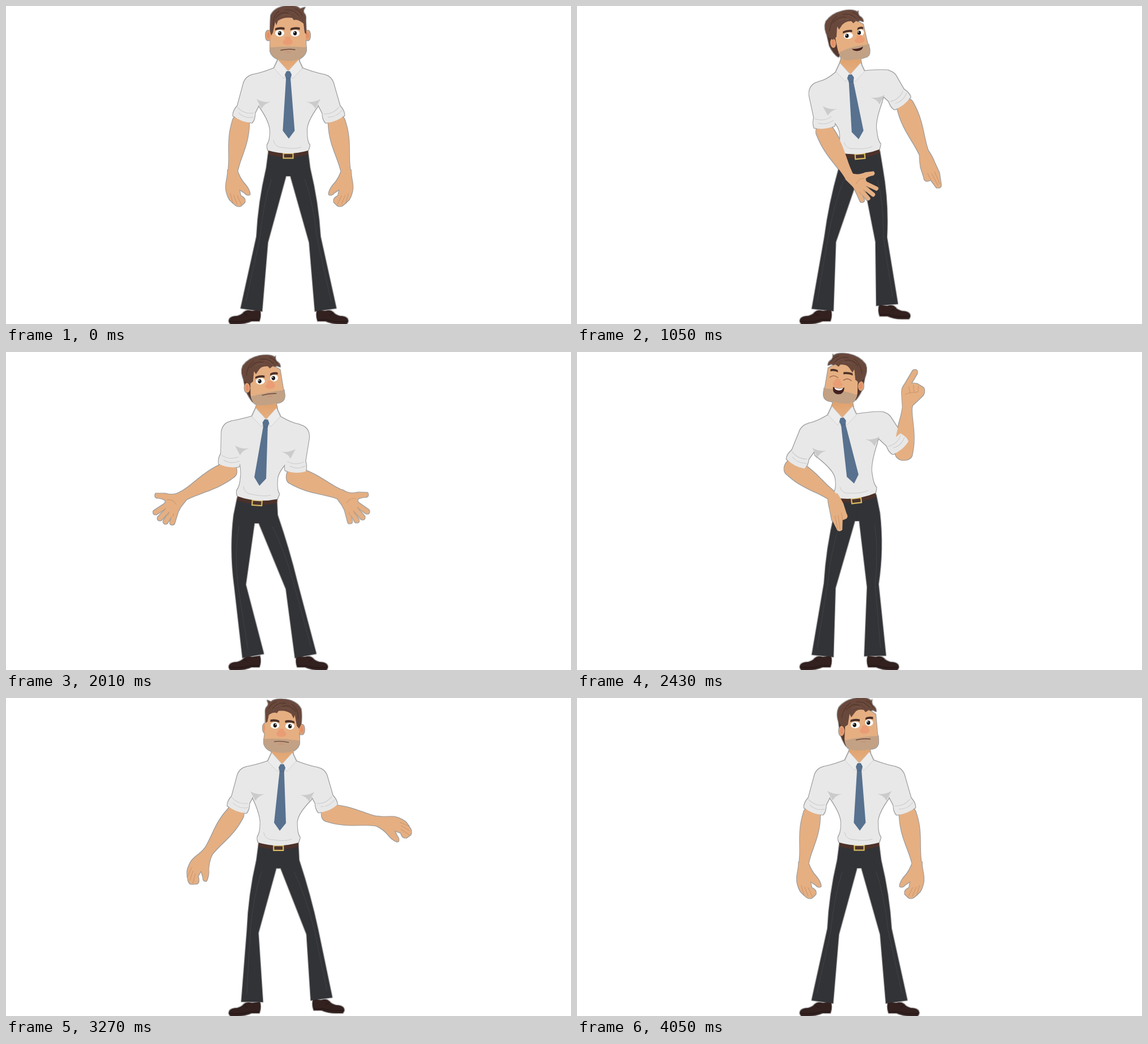
An HTML page for the animation above (4080 ms loop, 997 by 561 pixels).

```html
<!DOCTYPE html>
<html lang="en">
<head>
<meta charset="utf-8">
<title>Gesturing office man</title>
<style>
  html, body { margin: 0; width: 100%; height: 100%; overflow: hidden; background: #fff; }
  svg { display: block; width: 100vw; height: 100vh; }
</style>
</head>
<body>
<svg viewBox="0 0 997 561">
  <defs>
    <filter id="edge" filterUnits="userSpaceOnUse" x="0" y="-10" width="997" height="580" color-interpolation-filters="sRGB">
      <feMorphology in="SourceAlpha" operator="dilate" radius="1" result="fat"/>
      <feFlood flood-color="#9c9c9c"/>
      <feComposite in2="fat" operator="in" result="rim"/>
      <feMerge><feMergeNode in="rim"/><feMergeNode in="SourceGraphic"/></feMerge>
    </filter>
    <linearGradient id="throat" x1="0" y1="0" x2="0" y2="1">
      <stop offset="0" stop-color="#dfa06a"/><stop offset="1" stop-color="#e6b184"/>
    </linearGradient>
  </defs>
  <g id="man" filter="url(#edge)"></g>
</svg>
<script>
const LOOP = 4080, STEP = 30;
const SKIN = '#e5af82', CREASE = '#c58f66', SHIRT = '#e8e8e8', FOLD = '#cbcbcb';
const PANTS = '#323337', HAIR = '#69483c', DARK = '#4b3129', TIE = '#57718f', SHOE = '#33211f';

// Arms: shoulder x y, elbow x y, wrist x y, hand angle
function arm(side, type, sx, sy, ex, ey, wx, wy, hand) {
  const dx = wx - ex, dy = wy - ey;
  return { side, type, v: [sx, sy, ex, ey, Math.atan2(dy, dx) * 180 / Math.PI, Math.hypot(dx, dy), hand] };
}
const left = (type, ...p) => arm(1, type, ...p);
const right = (type, ...p) => arm(-1, type, ...p);

// Body: neck x y, hip x y, hip tilt, left knee, right knee, foot shift, head yaw, head tilt
const stand = {
  face: 'calm', body: [498, 117, 498, 264, 0, 452, 545, 0, 0, 0],
  l: left('relaxed', 439, 143, 414, 208, 400, 293, 78),
  r: right('relaxed', 558, 143, 584, 208, 600, 293, 102)
};
const heart = {
  face: 'smile', body: [501, 125, 543, 265, -12, 475, 563, 0, 1, -10],
  l: left('chest', 455, 166, 479, 235, 557, 190, -66),
  r: right('flat', 570, 126, 622, 150, 592, 236, 90)
};
const shrug = {
  face: 'calm', body: [458, 120, 443, 265, 4, 410, 503, -36, 1, 0],
  l: left('open', 399, 142, 384, 206, 292, 207, 160),
  r: right('open', 515, 148, 526, 216, 614, 240, 20)
};
const offer = {
  face: 'calm', body: [459, 121, 443, 266, 4, 413, 504, -36, .5, -4],
  l: left('open', 401, 144, 392, 209, 311, 255, 140),
  r: right('open', 514, 150, 510, 219, 591, 252, 42)
};
const laugh = {
  face: 'laugh', body: [468, 118, 493, 262, -7, 446, 522, -36, -.55, 4],
  l: left('flat', 412, 148, 381, 205, 452, 255, 85),
  r: right('point', 537, 128, 577, 176, 583, 95, -86)
};
const swing = {
  face: 'calm', body: [493, 119, 477, 265, 2, 432, 546, 2, 0, 0],
  l: left('relaxed', 433, 142, 411, 205, 350, 262, 113),
  r: right('relaxed', 550, 150, 570, 212, 620, 285, 70)
};
const nudge = (a, turn) => ({ ...a, v: a.v.map((n, i) => i === 4 || i === 6 ? n + turn : n) });
const wide = { ...swing, l: nudge(swing.l, 16), r: nudge(swing.r, -17) };
const glance = yaw => ({ ...stand, body: stand.body.map((n, i) => i === 8 ? yaw : n) });

const smooth = u => u * u * (3 - 2 * u);
const speedUp = u => u * u;
const slowDown = u => u * (2 - u);
// Each key: time, pose, easing used to arrive there
const KEYS = [
  [0, stand], [450, heart, smooth], [890, heart, smooth], [1240, shrug, smooth],
  [1580, shrug, smooth], [1980, offer, smooth], [2010, offer, smooth], [2350, laugh, smooth],
  [3030, laugh, smooth], [3380, wide, smooth], [3570, swing, speedUp],
  [3870, glance(.1), slowDown], [4050, glance(.5), smooth], [LOOP, glance(.5), smooth]
];

const mix = (a, b, u) => a.map((n, i) => n + (b[i] - n) * u);
function poseAt(t) {
  const i = KEYS.findIndex(k => k[0] > t);
  const [t0, a] = KEYS[i - 1], [t1, b, ease] = KEYS[i];
  const u = ease((t - t0) / (t1 - t0)), near = u < .5 ? a : b;
  const limb = k => ({ ...near[k], v: mix(a[k].v, b[k].v, u) });
  return { face: near.face, body: mix(a.body, b.body, u), l: limb('l'), r: limb('r') };
}

const shape = (fill, d, more = '') => `<path fill="${fill}" d="${d}" ${more}/>`;
const line = (color, width, d) =>
  `<path fill="none" stroke="${color}" stroke-width="${width}" stroke-linecap="round" stroke-linejoin="round" d="${d}"/>`;
const oval = (fill, x, y, rx, ry) => `<ellipse fill="${fill}" cx="${x}" cy="${y}" rx="${rx}" ry="${ry}"/>`;
const place = (x, y, angle, inner, sx = 1, sy = 1) =>
  `<g transform="translate(${x} ${y}) rotate(${angle}) scale(${sx} ${sy})">${inner}</g>`;

const openHand =
  shape(SKIN, 'M-5-8L14-12Q24-17 29-15L36 3Q36 9 30 11L27 14Q28 20 36 27Q38 33 32 34L20 24Q10 9-5 8Z') +
  line(SKIN, 8, 'M29 6L54 9M29-1L55-4M28-8L51-15M23-11L43-24') +
  line(CREASE, .8, 'M24 13Q15 7 17-4M36 3L42 2.5M35-6L41-9M31-13L35-16');
const HANDS = {
  open: openHand,
  chest: place(0, 0, 0, openHand, .93, -.93),
  relaxed:
    shape(SKIN, 'M-5 8C8 10 18 18 29 18Q40 18 47 15L58 7Q64 1 60-4L56-10Q50-13 44-5L32-5L40-13Q48-18 44-22Q36-22 28-18Q14-9-5-8Z') +
    line(CREASE, .8, 'M57 4L40 7M53 11L36 12M59-3L42 1'),
  flat:
    shape(SKIN, 'M-5 9Q10 10 20 8L40 6L60-2Q64-6 60-11L43-13L41-20Q37-24 32-21L14-17Q4-13-5-8Z') +
    line(CREASE, .8, 'M57-3L34 0M58-7L34-6M43-13L30-12'),
  point:
    shape(SKIN, 'M-4 8L18 11Q30 13 36 8Q42-4 40-14L34-26Q26-32 17-23L2-9L-4-8Z') +
    line(SKIN, 9, 'M32 5L60-9') +
    line(CREASE, .8, 'M34 0L24-3L20 5M37-8L25-10L23-3M36-17L26-17L24-10')
};

function forearm({ side, type, v: [, , ex, ey, angle, len, hand] }) {
  const a = len * .4, b = len * .65, rad = angle * Math.PI / 180;
  const d = `M-2-15C-19-15-19 15-2 15C${a} 20 ${b} 9 ${len} 8V-8C${b}-9 ${a}-20-2-15Z`;
  return place(ex, ey, angle, shape(SKIN, d)) +
    place(ex + len * Math.cos(rad), ey + len * Math.sin(rad), hand, HANDS[type], 1, side);
}

function sleeve({ v: [sx, sy, ex, ey] }, cuffOnly) {
  const angle = Math.atan2(ey - sy, ex - sx) * 180 / Math.PI;
  const c = Math.hypot(ex - sx, ey - sy) - 9;
  const cuff = shape(SHIRT, `M${c - 20}-16Q${c - 9}-21 ${c}-18Q${c + 6} 0 ${c} 18Q${c - 9} 21 ${c - 20} 16Z`) +
    line(FOLD, 1, `M${c - 17}-14Q${c - 9} 0 ${c - 16} 15M${c - 10}-17Q${c - 2}-3 ${c - 8} 10`);
  const upper = shape(SHIRT, `M0-21C-29-21-29 21 0 21L${c - 12} 16V-16Z`);
  return place(sx, sy, angle, cuffOnly ? cuff : upper);
}

function armpit({ side, v: [x, y] }) {
  const at = (dx, dy) => `${x + dx * side} ${y + dy}`;
  return shape(FOLD, `M${at(3, 21)}Q${at(14, 28)} ${at(28, 26)}Q${at(17, 29)} ${at(12, 38)}Z`);
}

function torso(nx, ny, hx, hy, tilt, l, r) {
  const rad = tilt * Math.PI / 180;
  const hip = (x, y) => `${hx + x * Math.cos(rad) - y * Math.sin(rad)} ${hy + x * Math.sin(rad) + y * Math.cos(rad)}`;
  const top = ({ side, v: [x, y] }) => `${nx - 23 * side} ${ny - 8}Q${x + 10 * side} ${y - 24} ${x - 4 * side} ${y - 22}`;
  const pit = ({ side, v: [x, y] }) => `${x + 8 * side} ${y + 34}`;
  const [lx, ly] = l.v, [rx, ry] = r.v;
  return shape(SHIRT,
    `M${top(l)}L${lx} ${ly}L${pit(l)}Q${hip(-31, -58)} ${hip(-32, -42)}Q${hip(-32, -26)} ${hip(-37, -19)}` +
    `Q${hip(-38, -14)} ${hip(-35, -9)}Q${hip(0, 1)} ${hip(35, -9)}L${hip(38, -18)}Q${hip(33, -24)} ${hip(33, -42)}` +
    `Q${hip(31, -58)} ${pit(r)}L${rx} ${ry}L${rx + 4} ${ry - 22}Q${rx - 10} ${ry - 24} ${nx + 23} ${ny - 8}Z`) +
    line(FOLD, 1, `M${hip(-26, -27)}Q${hip(-24, -14)} ${hip(-8, -14)}Q${hip(12, -11)} ${hip(23, -15)}`);
}

function trousers(hx, hy, tilt, kneeL, kneeR, footR, footY) {
  const rad = tilt * Math.PI / 180;
  const leg = (side, kx, ax, ay) => {
    const ky = 410, out = -side;
    const shin = Math.atan2(kx - ax, ay - ky), c = 19 * side * Math.cos(shin), s = 19 * side * Math.sin(shin);
    const bx = hx + out * 35 * Math.cos(rad), by = hy - 6 + out * 35 * Math.sin(rad);
    const ox = kx + out * 10, ix = kx - out * 10;
    // The thigh bulges less the further the leg is spread
    const splay = Math.max(0, (ox - bx) * out);
    const tx = hx + out * (42 - splay * .16), ty = hy + 22;
    const mx = (tx + ox) / 2 + out * Math.max(0, 9 - splay * .15), my = (ty + ky) / 2;
    const crotch = hx - tilt * .17;
    return shape(PANTS,
      `M${hx} ${hy - 3}L${bx} ${by}L${tx} ${ty}Q${mx} ${my} ${ox} ${ky - s}` +
      `L${ax - c} ${ay - s}L${ax + c} ${ay + s}L${ix} ${ky + s + 4}` +
      `L${crotch + out * 4} ${hy + 36}H${crotch - out}Z`) +
      line('#45464a', .8, `M${tx - out * 9} ${ty + 20}Q${mx - out * 9} ${my} ${kx + out * 4} ${ky}L${ax - c * .5} ${ay - s * .5 - 14}`);
  };
  const belt = shape(DARK, 'M-35-10Q0 1 35-10V-2Q0 8-35-2Z') +
    '<rect x="-8.5" y="-4" width="17" height="8.5" fill="#4b332d" stroke="#d8bb62" stroke-width="2.2"/>';
  return leg(1, kneeL, 433 - (kneeL - 452) * .08, 536) +
    leg(-1, kneeR, 564 + footR - (kneeR - footR - 545) * .15, 536 + footY) + place(hx, hy, tilt, belt);
}

const shoe = shape(SHOE, 'M420 540Q425 535 434 538L448 536Q451 546 447 556H433Q422 561 408 561H396Q391 556 395 551Q399 547 408 547Q416 545 420 540Z') +
  line('#1f1414', 1, 'M394 556Q408 558 420 556L432 553H447M419 541L426 546');

function collar(x, y, dir) {
  const flap = s => shape('#ececec', `M${18 * s}-22L${25 * s}-7L${8 * s} 11L0-2Z`, `stroke="${FOLD}" stroke-width=".8"`);
  const n = Math.hypot(dir.x, dir.y), ang = Math.atan2(-dir.x, dir.y) * 180 / Math.PI;
  const tie = shape(TIE, `M-3-2H3L6 4L4 11L10.5 ${n - 14}L0 ${n}L-10.5 ${n - 14}L-4 11L-6 4Z`) +
    line('#486180', .8, 'M-4 11H4');
  return place(x, y, 0, flap(-1) + flap(1)) + place(x, y, ang, tie);
}

function head(yaw, face) {
  // m follows the whole turn, h covers what is done after half of it
  const y = Math.abs(yaw), half = Math.min(1, y * 2);
  const m = (a, b) => a + (b - a) * y, h = (a, b) => a + (b - a) * half;
  const jaw = `L${m(-32, -18)} -16Q${m(-29, -17)} ${m(-5, -9)} ${m(-15, -9)} ${h(0, -3)}Q${m(0, 10)} ${h(4, -1)} ${m(15, 26)} ${h(0, -5)}` +
    `Q${m(30, 36)} -6 ${m(32, 36)} -18`;
  const backHair = shape('#54382f',
    `M${h(-29, -38)} -66L${h(-29, -34)} -33Q${h(-28, -29)} -18 ${m(-26, -20)} -10L${m(-20, -13)} -20L-15 -66Z`);
  const ear = (x, ey) => oval('#e0a071', x, ey, 5, 9) + oval('#e58d69', x, ey, 2.5, 5.5);
  const skull = shape(SKIN, `M${h(-31, -24)} -64L${m(-32, -20)} -23${jaw}L${m(31, 33)} -32L${h(31, 29)} -66Q0 -88 ${h(-31, -24)} -64Z`);
  const stubble = shape('#c2a184', `M${m(-32, -20)} ${m(-22, -18)}${jaw}L${m(32, 35)} ${h(-22, -28)}Q${m(0, 9)} ${m(-25, -30)} ${m(-32, -20)} ${m(-22, -18)}Z`);

  const hair = shape(HAIR,
    `M${h(-30, -27)} -43L${h(-32, -35)} -50Q${h(-32, -42)} -66 ${h(-31, -36)} -78Q-25 -92 ${m(-5, -4)} -95` +
    `Q14 -97 21 -90L${h(30, 23)} -93Q${h(25, 21)} -87 ${h(28, 24)} -82Q${h(32, 30)} -78 ${h(31, 30)} -71` +
    `L${h(32, 24)} ${h(-45, -74)}L${h(29, 20)} ${h(-48, -72)}L${h(27, 17)} ${h(-64, -74)}Q16 -73 ${m(10, 12)} -70` +
    `L${m(7, 9)} -74Q${m(-7, 0)} -76 ${h(-18, -8)} -69L${h(-21, -14)} -61L${h(-23, -17)} -67L${h(-27, -20)} -48Z`) +
    line('#503429', 1.1, `M${m(-22, -24)} -74Q-12 -87 0 -82M-5 -88Q8 -90 18 -78M${h(-26, -31)} -60Q-28 -78 -16 -86M12 -90Q20 -88 25 -78`) +
    line('#7b594b', .9, `M-14 -76Q-6 -82 4 -78M4 -86Q13 -83 17 -75`);

  const nearX = m(-15, 1), farX = m(12, 23), nearY = m(-47, -48), farY = h(-47, -51.5);
  const brow = (x, by, w) => shape(DARK, `M${x - w} ${by + 3}L${x - w + 1} ${by - 1}Q${x} ${by - 4} ${x + w} ${by - 2}L${x + w} ${by + 2}Q${x} ${by} ${x - w} ${by + 3}Z`);
  const eye = (x, ey, rx) => face === 'laugh'
    ? line('#a66b4c', 1.6, `M${x - 7} ${ey + 2}Q${x} ${ey - 4} ${x + 7} ${ey + 2}`)
    : oval('#fff', x, ey, rx, 6) + oval('#151515', x + m(0, -2.5), ey, 3.2, 3.8) + oval('#fff', x + m(-1.2, -3.7), ey - 1.5, 1, 1);
  const lift = face === 'laugh' ? 3 : 0;
  const nx = m(-1, 20), ny = h(0, -6), nose = shape('#ea9d75',
    `M${nx - 4} ${ny - 41}Q${nx - 4} ${ny - 36} ${nx - 9} ${ny - 32}Q${nx - 8} ${ny - 26} ${nx} ${ny - 26}` +
    `Q${nx + 9} ${ny - 26} ${nx + 9} ${ny - 33}Q${nx + 5} ${ny - 37} ${nx + 4} ${ny - 41}Z`);

  const mx = m(0, 15), my = h(-18, -22);
  const mouths = {
    calm: line('#6d4638', 1.4, `M${mx - 13} ${my + 1}Q${mx} ${my - 2} ${mx + 12} ${my - m(0, 1)}`) +
      line('#d08e74', 1.4, `M${mx - 4} ${my + 4}H${mx + 4}`),
    smile: shape('#43201f', `M${mx - 10} ${my - 1}Q${mx} ${my + 1} ${mx + 10} ${my - 3}Q${mx + 8} ${my + 4} ${mx} ${my + 4}Q${mx - 7} ${my + 4} ${mx - 10} ${my - 1}Z`),
    laugh: shape('#43201f', `M${mx - 10} ${my - 10}Q${mx} ${my - 6} ${mx + 10} ${my - 10}Q${mx + 11} ${my + 3} ${mx} ${my + 3}Q${mx - 10} ${my + 3} ${mx - 10} ${my - 10}Z`) +
      shape('#fff', `M${mx - 8} ${my - 9}Q${mx} ${my - 6} ${mx + 8} ${my - 9}Q${mx + 6} ${my - 4} ${mx} ${my - 4}Q${mx - 6} ${my - 4} ${mx - 8} ${my - 9}Z`)
  };
  return ear(h(34, 18), -43) + backHair + skull + ear(m(-35, -27), h(-43, -37)) + stubble + hair +
    brow(nearX - m(0, 1), nearY - 8 - lift, 8.5) + brow(farX, farY - 8 - lift, m(8.5, 5.5)) +
    eye(nearX, nearY, 8) + eye(farX, farY, m(8, 6)) + nose + mouths[face];
}

function draw(t) {
  const { face, body, l, r } = poseAt(t);
  const [nx, ny, hx, hy, tilt, kneeL, kneeR, foot, yaw, roll] = body;
  const lift = foot < 0 ? -9 * Math.sin(Math.PI * foot / -36) : 0;
  const tip = { x: (hx - nx) * .8 + 1, y: hy - 30 - ny };
  // A tilted head also leans back, which shortens it
  const lean = Math.min(1, Math.abs(roll) / 4);
  const neck = shape('url(#throat)', 'M-15-34H17L20-20L0 2L-19-20Z');
  man.innerHTML =
    shoe + `<g transform="translate(${997 + foot} ${lift}) scale(-1 1)">${shoe}</g>` +
    trousers(hx, hy, tilt, kneeL, kneeR, foot, lift) +
    torso(nx, ny, hx, hy, tilt, l, r) + sleeve(l) + sleeve(r) + armpit(l) + armpit(r) +
    place(nx, ny, 0, neck) +
    place(nx, ny - 22 - 3 * lean, roll, head(yaw, face), yaw < 0 ? -1 : 1, 1 - .05 * lean) +
    collar(nx, ny, tip) + forearm(r) + forearm(l) + sleeve(l, true) + sleeve(r, true);
}

const man = document.getElementById('man');
const start = performance.now();
function tick() {
  const t = (performance.now() - start) % LOOP;
  draw(Math.floor(t / STEP) * STEP);
  requestAnimationFrame(tick);
}
tick();
</script>
</body>
</html>
```
